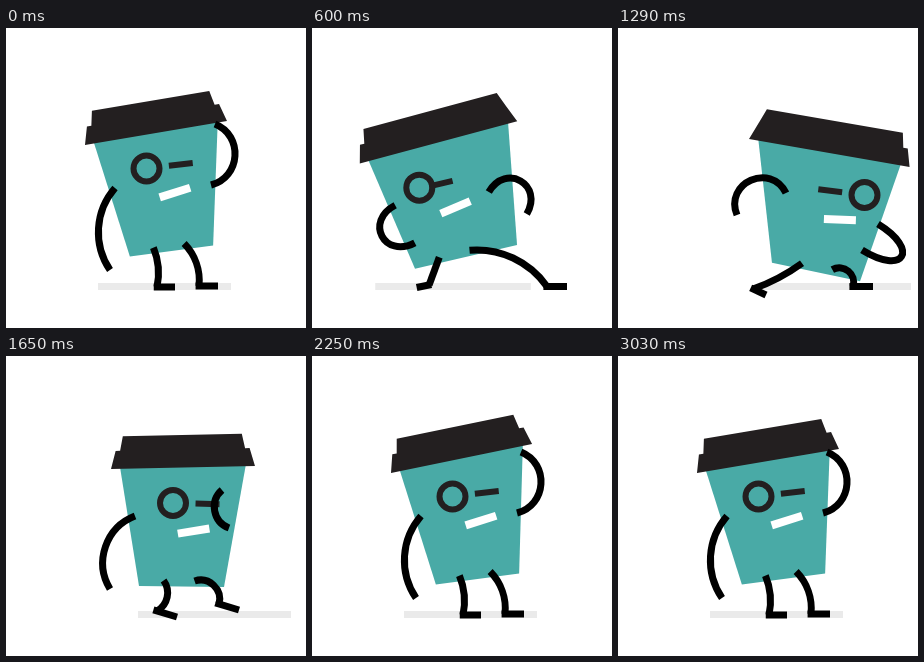
Animation of 300 by 300 pixels, one loop 3.18 s. Source, as an HTML page with a canvas:

```html
<!DOCTYPE html>
<html lang="en">
<head>
<meta charset="utf-8">
<title>Walking coffee cup</title>
<style>
html, body { margin: 0; width: 100%; height: 100%; overflow: hidden; background: #fff; }
canvas { display: block; width: 100vw; height: 100vh; }
</style>
</head>
<body>
<canvas width="300" height="300"></canvas>
<script>
const ctx = document.querySelector('canvas').getContext('2d');
const LOOP = 3180, STEP = 30, LAST = 3030;
const TEAL = '#49aaa6', DARK = '#231f20', LIMB = '#000', SHADE = '#eaeaea';
const clamp = (v, lo, hi) => Math.max(lo, Math.min(hi, v));

// Rig controls:
//   slide: shift of the whole figure   shadow: left, right
//   lid: x, y, tilt, stretch           base: centre x, y, width, hip offset
//   face: lens x, y, facing, mouth offset
//   arm: shoulder, hand, bow           leg: ankle, bow, toe direction
const stand = {
  slide: [0], shadow: [92, 225],
  lid: [79, 117, -9.6, 0], base: [165.5, 223, 84, -2], face: [140.5, 140.5, 1, 24],
  armL: [109, 160, 104, 242, 14], armR: [205, 157, 209, 96, 22],
  legL: [151, 259, -3, 18, 0], legR: [193, 258, -5, 19, 0]
};
const leanBack = {
  slide: [0], shadow: [56, 213],
  lid: [40, 141, -20.6, 1], base: [155, 225.5, 108, -13], face: [87, 158, 1, 41],
  armL: [75, 180, 110, 221, 26], armR: [169, 157, 219, 178, -23],
  legL: [127, 259, 0, -19, 0], legR: [188, 259, -3, 19, -7]
};
const stride = {
  slide: [0], shadow: [130, 279],
  lid: [117, 111, 9.9, 1], base: [184, 244, 90, 0], face: [232.5, 167, -1, -20],
  armL: [154, 165, 105, 187, 26], armR: [246, 196, 230, 222, -37],
  legL: [107, 248, 0, 17, 14], legR: [235, 258.5, -9, 20, 0]
};
const turn = {
  slide: [0], shadow: [132, 285],
  lid: [105, 113, -1.2, 0], base: [175.5, 230.5, 85, -2.5], face: [167, 147, 1, 20],
  armL: [129, 160, 104, 233, 18], armR: [223, 172, 216, 134, -11],
  legL: [151, 255, -7, 20, 6], legR: [213, 248, -10, 20, 6]
};
const reach = { ...leanBack, slide: [-7], legR: [242, 258.5, -12, 20, 0] };
const leanIn = { ...stride, slide: [14], legL: [121, 261, -2, 13, 6], legR: [221, 258.5, -9, 20, 0] };

const keys = [
  [0, stand], [240, leanBack], [510, reach], [840, stride], [1110, leanIn],
  [1350, leanIn], [1650, turn], [2100, stand], [LOOP, stand]
];

// Monotone cubic interpolation: flows through keys without overshoot.
function poseAt(t) {
  const k = keys.findIndex(key => key[0] > t) - 1;
  const [t0, from] = keys[k], [t1, to] = keys[k + 1];
  const span = t1 - t0, u = (t - t0) / span, w = 1 - u;
  const tangent = (p, q) => p * q > 0 ? 2 * p * q / (p + q) : 0;
  const blend = part => from[part].map((a, i) => {
    const slope = n => keys[n] && keys[n + 1]
      ? (keys[n + 1][1][part][i] - keys[n][1][part][i]) / (keys[n + 1][0] - keys[n][0]) : 0;
    const m0 = tangent(slope(k - 1), slope(k)), m1 = tangent(slope(k), slope(k + 1));
    return a * w * w * (1 + 2 * u) + to[part][i] * u * u * (3 - 2 * u)
      + span * u * w * (m0 * w - m1 * u);
  });
  return Object.fromEntries(Object.keys(from).map(part => [part, blend(part)]));
}

// Three equal knocks, the first one peaking at the given time.
function knock(t, peak) {
  const n = clamp(Math.round((t - peak) / 333), 0, 2);
  const x = (t - peak) / 333 - n;
  return Math.abs(x) < 0.5 ? Math.cos(Math.PI * x) ** 2 : 0;
}

// Maps (along, down) in a tilted frame to stage coordinates.
function frame(x, y, degrees) {
  const c = Math.cos(degrees * Math.PI / 180), s = Math.sin(degrees * Math.PI / 180);
  return (along, down) => [x + along * c - down * s, y + along * s + down * c];
}

function fill(points, color) {
  ctx.beginPath();
  for (const p of points) ctx.lineTo(...p);
  ctx.fillStyle = color;
  ctx.fill();
}

function line(from, to, color, width) {
  ctx.beginPath();
  ctx.moveTo(...from);
  ctx.lineTo(...to);
  ctx.strokeStyle = color;
  ctx.lineWidth = width;
  ctx.stroke();
}

function dash([x, y], length, degrees, color, width) {
  const at = frame(x, y, degrees);
  line(at(-length / 2, 0), at(length / 2, 0), color, width);
}

// Near-circular arc whose middle stands off its chord by the bow.
function limb(x0, y0, x1, y1, bow) {
  const dx = x1 - x0, dy = y1 - y0, chord = Math.hypot(dx, dy);
  const along = Math.max(0, 1 - (2 * bow / chord) ** 2) / 3;
  const nx = -dy / chord * bow * 4 / 3, ny = dx / chord * bow * 4 / 3;
  ctx.beginPath();
  ctx.moveTo(x0, y0);
  ctx.bezierCurveTo(x0 + dx * along + nx, y0 + dy * along + ny,
    x1 - dx * along + nx, y1 - dy * along + ny, x1, y1);
  ctx.strokeStyle = LIMB;
  ctx.lineWidth = 7;
  ctx.stroke();
}

function leg(hip, [x, y, bow, toeX, toeY]) {
  limb(...hip, x, y, bow);
  line([x - toeX * 0.18, y - toeY * 0.18], [x + toeX, y + toeY], LIMB, 7);
}

// The rim notch flattens on the raised side while the lid is stretched.
function lidOutline(at, width, tilt, stretch) {
  const side = flat => [[0, 0], [5 + 2 * flat, -18], [9.5 - 2.5 * flat, -18], [12.5, -32.5]];
  const left = side(stretch * clamp(tilt / 10, 0, 1));
  const right = side(stretch * clamp(-tilt / 10, 0, 1)).reverse();
  return [...left, ...right.map(([a, d]) => [width - a, d])].map(p => at(...p));
}

function draw(t) {
  const { slide, shadow, lid, base, face, armL, armR, legL, legR } = poseAt(t);
  const [lidX, lidY, tilt, stretch] = lid;
  const [baseX, baseY, baseWidth, hip] = base;
  const [lensX, lensY, facing, mouth] = face;
  const width = 144 + 19 * stretch;
  const onLid = frame(lidX, lidY, tilt - 11 * knock(t, 2130));
  const onBase = frame(baseX, baseY, tilt + 2);
  const onFace = frame(lensX, lensY, tilt);
  const lift = knock(t, 2085);
  const [shoulderX, shoulderY, handX, handY, bow] = armR;

  ctx.clearRect(0, 0, 300, 300);
  ctx.save();
  ctx.translate(slide[0], 0);

  line([shadow[0], 258.5], [shadow[1], 258.5], SHADE, 7);
  fill([onLid(9, -2), onLid(width - 9, -2), onBase(baseWidth / 2, 0), onBase(-baseWidth / 2, 0)], TEAL);
  fill(lidOutline(onLid, width, tilt, stretch), DARK);

  dash(onFace(mouth, 28.5), 32, tilt - 8, '#fff', 8);
  dash(onFace(34.5 * facing, 1.7), 24, tilt + 3 * facing, DARK, 6);
  ctx.beginPath();
  ctx.arc(lensX, lensY, 13, 0, 2 * Math.PI);
  ctx.stroke();

  limb(...armL);
  limb(shoulderX, shoulderY, handX - 2.5 * lift, handY - 23 * lift, bow - 12 * lift);
  leg(onBase(hip - 15.5, -5.7), legL);
  leg(onBase(hip + 15.5, -5.7), legR);
  ctx.restore();
}

function tick() {
  const t = Math.floor(performance.now() % LOOP / STEP) * STEP;
  draw(Math.min(t, LAST));
  requestAnimationFrame(tick);
}
tick();
</script>
</body>
</html>
```
